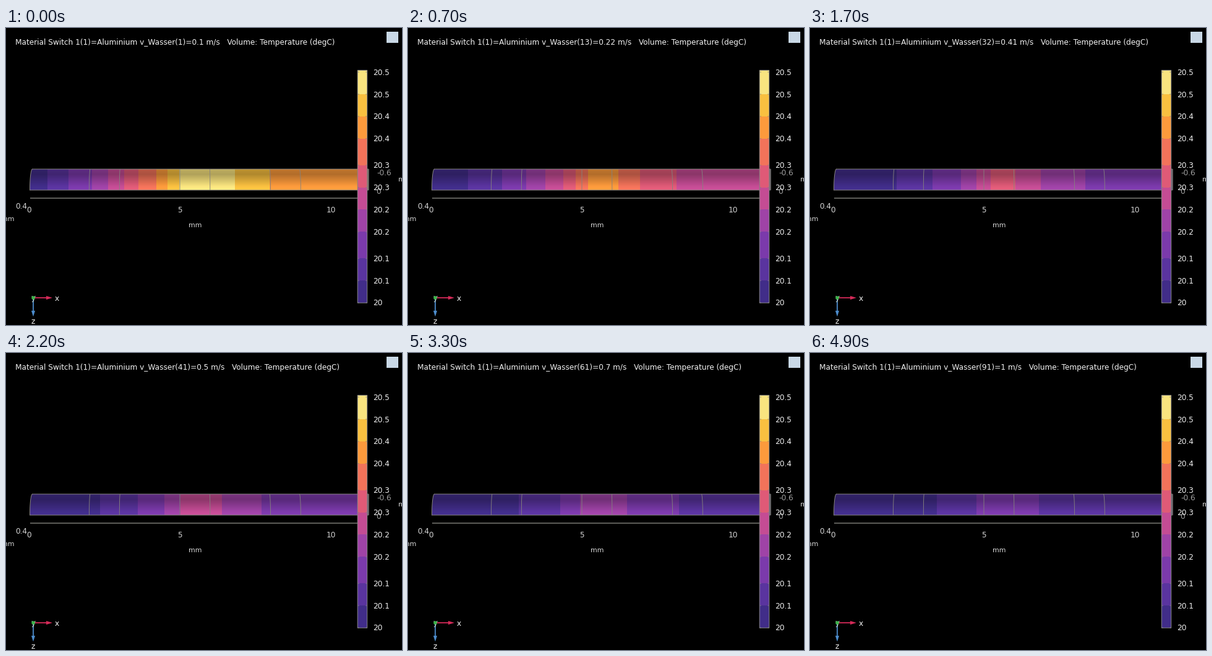
A matplotlib script for the animation above (5 s loop, 640x480 px).

```python
import numpy as np
import matplotlib.pyplot as plt
from matplotlib.animation import FuncAnimation
from matplotlib.colors import to_rgb
from matplotlib.patches import Circle, Polygon, Rectangle

W, H, DPI = 640, 480, 100
FRAMES, INTERVAL = 50, 100
LEFT, RIGHT, TOP, BOTTOM = 38, 586, 228, 262
MM = 48.9  # pixels per millimetre along the tube

LEVELS = ["#412d89", "#5a349f", "#7b3aab", "#9f43a7", "#c44c94",
          "#df5a77", "#f2735a", "#fc9a3c", "#f9c040", "#f9e47f"]
PALETTE = np.array([to_rgb(c) for c in LEVELS])
EDGE, TICK_TEXT = "#85827e", "#d4d4d4"

# Heat taken up along the tube: it climbs to the heater, then relaxes.
HEAT_KEYS = [(38, 0), (136, 0.43), (184, 0.81), (245, 1.63), (270, 2.38),
             (292, 3.26), (318, 3.5), (331, 3.13), (373, 2.25), (425, 1.77),
             (446, 1.53), (500, 1.355), (586, 1.35)]
columns = np.arange(LEFT, RIGHT) + 0.5
heat = np.interp(columns, *zip(*HEAT_KEYS))
inertia = 0.068 * heat + 0.02 * (columns < 318)

rows = (np.arange(BOTTOM - TOP) + 0.5) / (BOTTOM - TOP)
shade = np.interp(rows, [0, 0.06, 0.25, 0.5, 0.8, 1],
                  [0.84, 0.75, 0.71, 0.84, 1.0, 1.07])


def tube_image(speed):
    """Faster water carries heat away: the level falls as 1 / (speed + inertia)."""
    level = np.clip(heat / (speed + inertia), 0, len(LEVELS) - 1).astype(int)
    return np.clip(PALETTE[level] * shade[:, None, None], 0, 1)


plt.rcParams["font.family"] = "DejaVu Sans"
fig = plt.figure(figsize=(W / DPI, H / DPI), dpi=DPI, facecolor="black")
ax = fig.add_axes([0, 0, 1, 1])
ax.axis("off")


def label(x, y, text, size=12.1, color="#f0f0f0", ha="center"):
    return ax.text(x, y - 0.5, text, fontsize=size * 72 / DPI, color=color,
                   ha=ha, va="center_baseline", zorder=6)


def line(xs, ys, color=EDGE, width=1.0, z=3):
    ax.plot(xs, ys, color=color, lw=width * 72 / DPI, zorder=z,
            solid_capstyle="butt", snap=False)


def patch(shape, z=4):
    shape.set_zorder(z)
    return ax.add_patch(shape)


def ring(x, bulge):
    """Quarter ellipse: a cross-section seen slightly from the side."""
    y = np.linspace(TOP, BOTTOM, 40)
    t = (BOTTOM - y) / (BOTTOM - TOP)
    return x + bulge * (1 - np.sqrt(1 - t ** 2)), y


# Tube
tube = ax.imshow(tube_image(0.1), extent=(LEFT, RIGHT, BOTTOM, TOP),
                 aspect="auto", interpolation="nearest", zorder=1)
ax.set_xlim(0, W)
ax.set_ylim(H, 0)
cap_x, cap_y = ring(LEFT + 0.5, 4)
body = patch(Polygon([*zip(cap_x, cap_y), (RIGHT, BOTTOM), (RIGHT, TOP)],
                     fc="none", ec="none"))
tube.set_clip_path(body)
line(cap_x, cap_y)
line([42, RIGHT], [TOP, TOP])
line([LEFT, RIGHT], [BOTTOM, BOTTOM])
for mm in (2, 3, 5, 6, 8, 9):
    x = 37 + mm * MM
    line(*ring(x + 0.2 * (5 - mm) / 3 - 0.5, 0.5 * (5 - mm)), width=0.9)
line([585.5, 585.5], [TOP, BOTTOM], "#707070", 2.4)

# Axes
line([39, 569], [275, 275], "#8f8f88", 1.3)
for mm in (0, 5, 10):
    label(36.7 + mm * MM, 293, str(mm), color=TICK_TEXT)
for x, y in [(305.5, 318), (2.5, 308), (645, 245)]:
    label(x, y, "mm", 11, TICK_TEXT)
label(25, 287.5, "0.4", color=TICK_TEXT)
label(611.5, 233.5, "-0.6", color="#a0a0a0")
label(602.5, 263, "0", color="#a0a0a0")

# Colour bar: level limits are rounded to hundredths of a degree
BAR_TOP, BAR_BOTTOM, HUNDREDTH = 68, 444, 7.17
limits = [round(5.22 * k) for k in range(len(LEVELS) + 1)]
stops = [BAR_BOTTOM - HUNDREDTH * n for n in limits]
for y, color in zip(stops, LEVELS):
    patch(Rectangle((568, BAR_TOP), 16, y - BAR_TOP, fc=color, lw=0,
                    antialiased=False))
for y, n in zip(stops, limits):
    label(593.3, y, f"{20 + n / 100:.1f}" if n else "20", ha="left")
    for x in (568, 581):
        line([x, x + 3], [y, y], EDGE, 0.7, 5)
patch(Rectangle((568.2, BAR_TOP + 0.3), 15.5, BAR_BOTTOM - BAR_TOP, fc="none",
                ec="#858585", lw=0.72, snap=False), 5)

# Orientation triad
RED, BLUE, GREEN = "#d42a58", "#4c8ccc", "#3cb44a"
line([44, 67], [436, 436], RED, 1.8)
patch(Polygon([(65, 433), (75, 436), (65, 439)], fc=RED, lw=0))
line([44, 44], [436, 459], BLUE, 1.8)
patch(Polygon([(41, 457), (44, 466.5), (47, 457)], fc=BLUE, lw=0))
label(82.5, 436.5, "x")
label(44, 473.5, "z")
label(44.5, 435.5, "y", color="#c8d8c8")
patch(Circle((44, 436), 2.8, fc=GREEN, lw=0), 7)

# Badge
patch(Rectangle((615, 6), 19, 18, fc="#c9d8e6", lw=0))

title = label(15.3, 22.5, "", ha="left")


def update(i):
    step = 1 + i * 90 // (FRAMES - 1)
    speed = 0.1 + 0.01 * (step - 1)
    tube.set_data(tube_image(speed))
    title.set_text(f"Material Switch 1(1)=Aluminium v_Wasser({step})={speed:.3g} m/s"
                   "   Volume: Temperature (degC)")
    return tube, title


animation = FuncAnimation(fig, update, frames=FRAMES, interval=INTERVAL,
                          repeat=True, repeat_delay=0)
plt.show()
```
